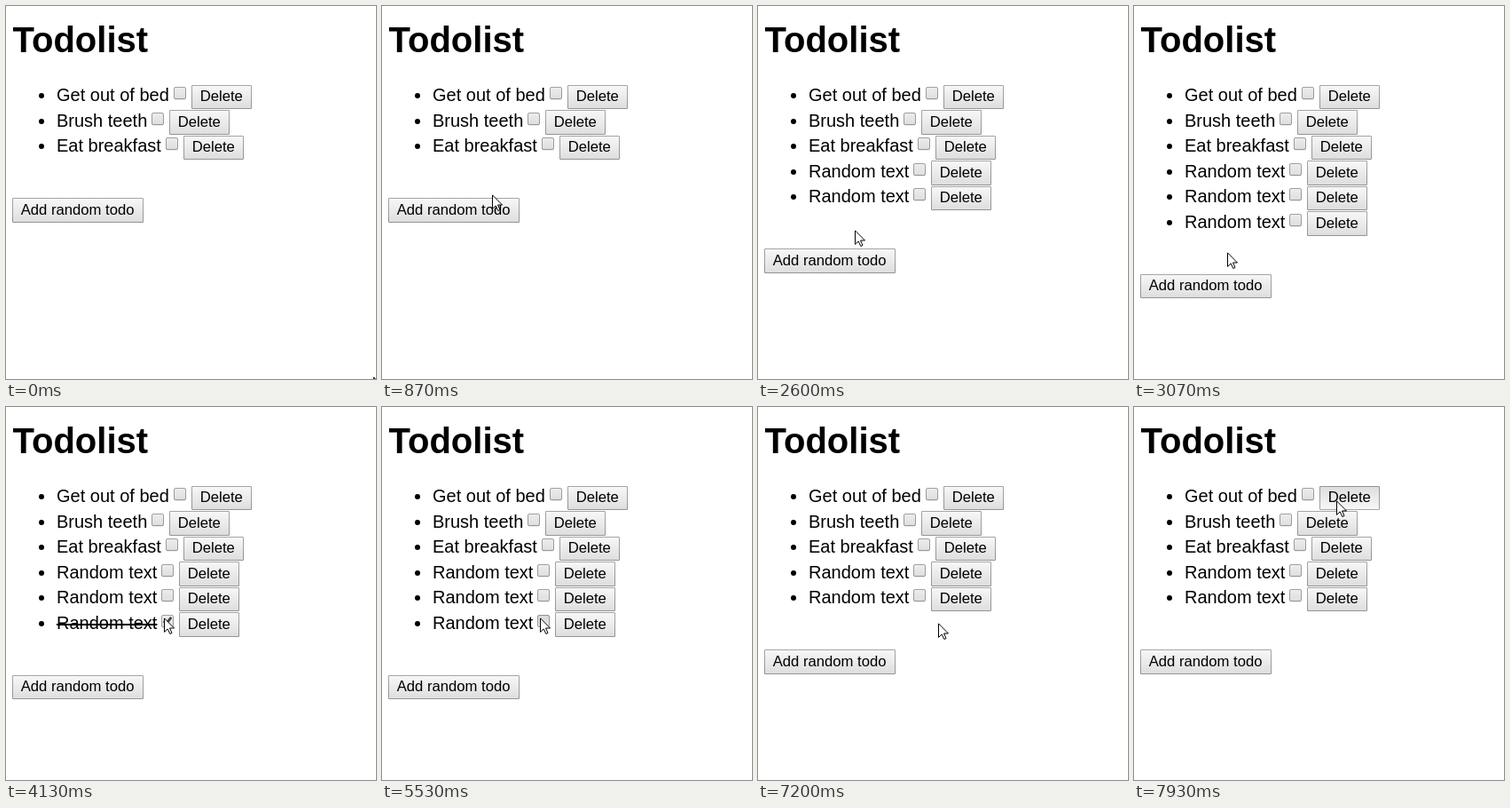
Animation, 417 px wide and 420 px high, one loop 8 s. Source, as an HTML page:

```html
<!DOCTYPE html>
<html lang="en">
<head>
<meta charset="utf-8">
<title>Todolist</title>
<style>
  html, body { margin: 0; width: 100%; height: 100%; overflow: hidden; background: #fff; }
  svg { display: block; font-family: "Liberation Sans", Arial, sans-serif; }
  .title { font-size: 40px; font-weight: bold; }
  .label { font-size: 20px; }
  .caption { font-size: 16.667px; }
</style>
</head>
<body>
<svg width="417" height="420" viewBox="0 0 417 420">
  <defs id="defs"></defs>
  <text class="title" x="7.5" y="52">Todolist</text>
  <g id="list"></g>
  <path id="cursor" fill="#fff" stroke="#000" d="M.5 .9V16.4L4.2 12.9L6.8 18.5L9 17.5L6.5 12H11.5Z"/>
</svg>
<script>
const LOOP = 8000, TICKS = 120;
const LEFT = 7, TEXT_X = 57, PITCH = 28.5, BOX = 14;
const todos = ['Get out of bed', 'Brush teeth', 'Eat breakfast'];
const extra = 'Random text';

// The story, in ticks of 1/15 s: when each click lands
const adds = [22, 36, 46], toggles = [62, 74, 84, 93], deletes = [108, TICKS];
const clicks = [...adds, ...toggles, ...deletes];

// Pointer moves, each from wherever the last one ended
const home = { x: 414, y: 417 };
const moves = [
  { from: 0, to: 3, x: 225, y: 243 },
  { from: 6, to: 8, x: 140, y: 222 },
  { from: 9, to: 13, x: 124, y: 212 },
  { from: 13, to: 17, x: 114, y: 225 },
  { from: 27, to: 34, x: 109, y: 250 },
  { from: 38, to: 44, x: 105, y: 277 },
  { from: 49, to: 57, x: 178, y: 237 },
  { from: 94, to: 97, x: 180, y: 240 },
  { from: 101, to: 102, x: 188, y: 240 },
  { from: 102, to: 106, x: 203, y: 243 },
  { from: 110, to: 116, x: 228, y: 105 }
];

const list = document.getElementById('list');
const cursor = document.getElementById('cursor');
const pen = document.createElement('canvas').getContext('2d');
pen.font = '20px "Liberation Sans", Arial, sans-serif';

const gradients = {
  raised: ['#f8f8f8', '#ddd'],
  sunken: ['#ddd', '#f8f8f8'],
  box: ['#ededed', '#dedede'],
  boxHover: ['#f0f0f0', '#e0e0e0'],
  boxPressed: ['#d7d7d7', '#e7e7e7']
};
document.getElementById('defs').innerHTML = Object.entries(gradients).map(([id, [top, bottom]]) =>
  `<linearGradient id="${id}" x2="0" y2="1"><stop stop-color="${top}"/><stop offset="1" stop-color="${bottom}"/></linearGradient>`
).join('');

const passed = (events, n) => events.filter(t => t <= n).length;
const clamp = k => Math.min(1, Math.max(0, k));
const smooth = k => k * k * (3 - 2 * k);

function pointerAt(n) {
  const p = moves.reduce((at, move) => {
    const k = smooth(clamp((n - move.from) / (move.to - move.from)));
    return { x: at.x + (move.x - at.x) * k, y: at.y + (move.y - at.y) * k };
  }, home);
  return { x: Math.round(p.x), y: Math.round(p.y), down: clicks.includes(n + 1) };
}

function stateOf(pointer, x, y, w, h) {
  const over = pointer.x >= x && pointer.x < x + w && pointer.y >= y && pointer.y < y + h;
  return over ? (pointer.down ? 'pressed' : 'hover') : 'normal';
}

function frame(x, y, w, h, radius, fill, alpha) {
  return `<rect x="${x}" y="${y}" width="${w}" height="${h}" rx="${radius}" fill="url(#${fill})"/>
    <rect x="${x + 0.5}" y="${y + 0.5}" width="${w - 1}" height="${h - 1}" rx="${radius - 0.5}" fill="none" stroke="#000" stroke-opacity="${alpha}"/>`;
}

function button(pointer, x, width, top, caption) {
  const y = Math.round(top), h = Math.round(top + 27.5) - y;
  const state = stateOf(pointer, x, y, width, h);
  return frame(x, y, width, h, 1, state === 'pressed' ? 'sunken' : 'raised', state === 'hover' ? 0.5 : 0.333) +
    `<text class="caption" x="${x + 9.7}" y="${Math.round(top + 18.5)}">${caption}</text>`;
}

function checkbox(pointer, x, y, checked) {
  const state = stateOf(pointer, x, y, BOX, BOX);
  const fill = { normal: 'box', hover: 'boxHover', pressed: 'boxPressed' }[state];
  const shadow = `<rect x="${x}" y="${y + 1}" width="${BOX}" height="${BOX}" rx="2" fill="#000" fill-opacity=".08"/>`;
  const step = BOX / 5;
  const mark = `<path d="M${x + step} ${y + BOX / 2}l${step} ${step}L${x + 4 * step} ${y + step}" fill="none" stroke="#444" stroke-width="${step}"/>`;
  return (state === 'pressed' ? '' : shadow) + frame(x, y, BOX, BOX, 2, fill, 0.32) + (checked ? mark : '');
}

function row(pointer, label, i, done) {
  const offset = i * PITCH, base = Math.round(107.25 + offset);
  const width = pen.measureText(label).width;
  const boxX = Math.round(TEXT_X + width + 5);
  const strike = done ? `<rect x="${TEXT_X}" y="${base - 6}" width="${width}" height="2"/>` : '';
  return `<circle cx="40" cy="${base - 6}" r="3"/>
    <text class="label" x="${TEXT_X}" y="${base}">${label}</text>${strike}` +
    checkbox(pointer, boxX, Math.round(91.25 + offset), done) +
    button(pointer, boxX + 20, 68, 88.75 + offset, 'Delete');
}

function draw(n) {
  const pointer = pointerAt(n);
  const added = passed(adds, n) - passed(deletes, n);
  const labels = [...todos, ...Array(added).fill(extra)];
  const done = passed(toggles, n) % 2 === 1;
  list.innerHTML =
    labels.map((label, i) => row(pointer, label, i, done && i === labels.length - 1)).join('') +
    button(pointer, LEFT, 148, 216.25 + added * PITCH, 'Add random todo');
  cursor.setAttribute('transform', `translate(${pointer.x} ${pointer.y})`);
}

const start = performance.now();
let shown = -1;
function loop() {
  const time = (performance.now() - start) % LOOP;
  const n = Math.floor((time + 4) * TICKS / LOOP) % TICKS;
  if (n !== shown) draw(shown = n);
  requestAnimationFrame(loop);
}
loop();
</script>
</body>
</html>
```
